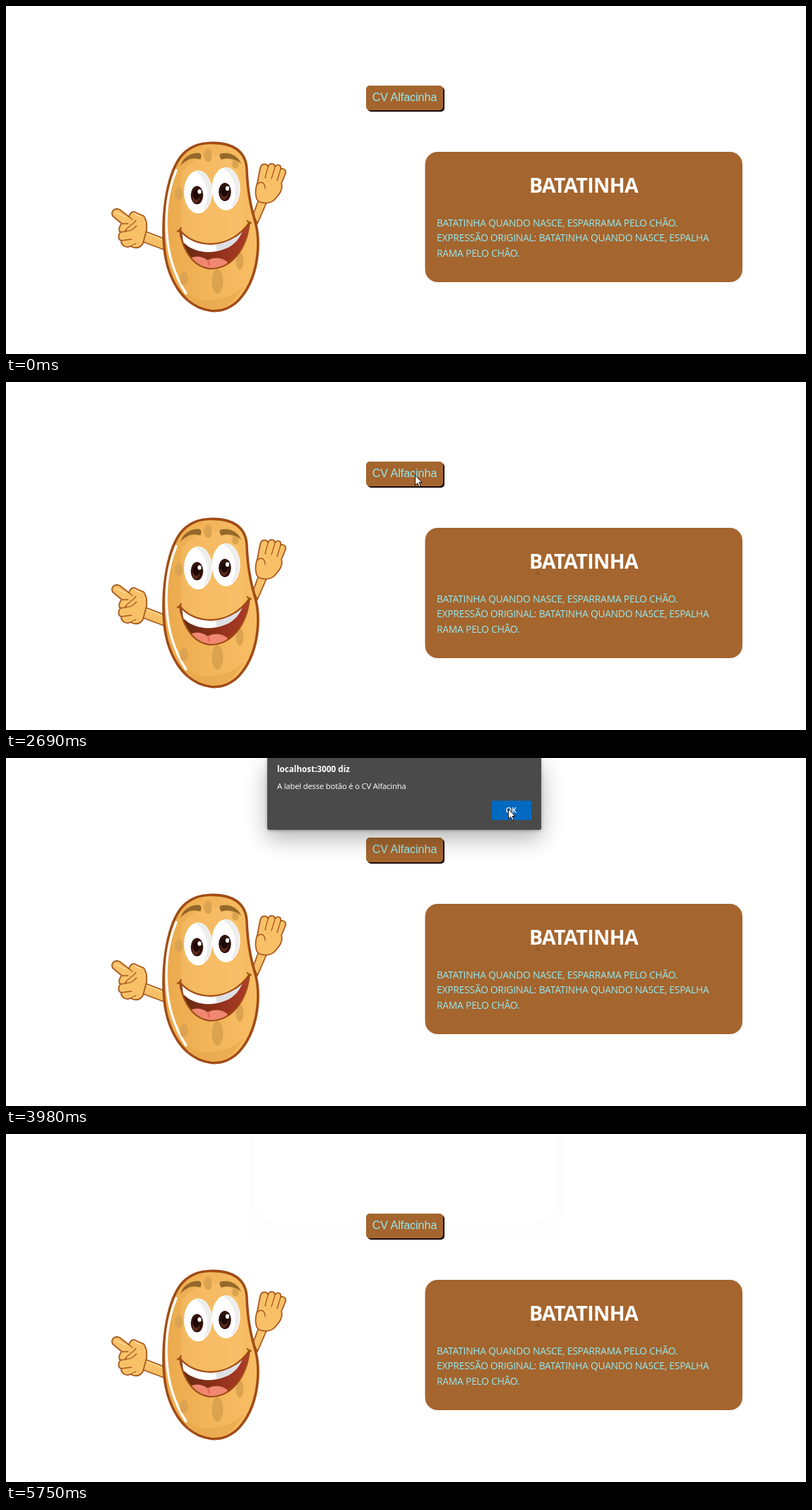
Write an HTML page that moves like this. It is 1133x494 px and loops after 6.35 s.

```html
<!DOCTYPE html>
<html lang="pt-BR">
<head>
<meta charset="utf-8">
<title>Batatinha</title>
<style>
html, body { margin: 0; width: 100%; height: 100%; overflow: hidden; background: #fff; }
svg { position: absolute; display: block; }
.full { left: 0; top: 0; }
text { font-family: "Open Sans", "Noto Sans", sans-serif; }
.button text { font: 16px "Liberation Sans", Arial, sans-serif; fill: #95eaf0; }
.card text { font-size: 13.8px; letter-spacing: -.2px; fill: #95eaf0; }
.card .title { font-size: 28.6px; letter-spacing: -.6px; font-weight: 700; fill: #fff; }
#dialog {
  left: 370px; top: 0; border-radius: 0 0 3px 3px; background: #4a4a4a;
  box-shadow: 0 12px 32px rgba(0, 0, 0, .3), 0 1px 4px rgba(0, 0, 0, .3);
  transform-origin: 50% 0;
}
#dialog text { fill: #fff; font-size: 11.3px; letter-spacing: -.2px; }
#dialog .host { font-size: 11.7px; font-weight: 700; letter-spacing: 0; }
#dialog .ok { font-size: 10.8px; font-weight: 600; letter-spacing: 0; }
</style>
</head>
<body>
<svg class="full" width="1133" height="494" viewBox="0 0 1133 494">
  <defs>
    <linearGradient id="skin">
      <stop offset="0" stop-color="#eaa94c"/>
      <stop offset=".45" stop-color="#f2b458"/>
      <stop offset="1" stop-color="#f8bd64"/>
    </linearGradient>
    <linearGradient id="throat">
      <stop offset="0" stop-color="#5f2912"/>
      <stop offset=".5" stop-color="#8a3019"/>
      <stop offset="1" stop-color="#b53d29"/>
    </linearGradient>
    <clipPath id="mouth">
      <path d="M246 318C268 346 318 346 345 307C341 345 320 372 291 373C265 372 250 346 246 318Z"/>
    </clipPath>
    <filter id="soft" x="-10%" y="-20%" width="120%" height="150%"><feGaussianBlur stdDeviation=".7"/></filter>
  </defs>

  <g id="halo">
    <rect x="340" y="-40" width="448" height="191" rx="30" fill="#fdfdfd"/>
    <rect x="352" y="-40" width="427" height="165" rx="30" fill="#fff"/>
  </g>

  <g class="button">
    <rect x="512" y="115" width="109" height="35" rx="5" fill="#1c0e06" filter="url(#soft)"/>
    <rect x="510" y="113" width="109" height="35" rx="5" fill="#a4652e"/>
    <text x="564.5" y="135.3" text-anchor="middle">CV Alfacinha</text>
  </g>

  <g class="potato" stroke-linejoin="round" stroke-linecap="round">
    <g fill="#f8c168" stroke="#a9581c" stroke-width="1.8">
      <path d="M195 319L226 331L224 346L192 334Z"/>
      <path d="M350 296L359 272L369 279L356 309Z"/>
      <path d="M199 318C200 310 198 302 195 298L181 292C177 292 175 296 174 299L161 289C154 286 148 291 151 298L164 309C160 312 159 319 162 321C158 326 159 332 163 333C163 340 170 344 176 341C184 345 190 344 194 337Z"/>
      <path d="M357 277C352 270 353 259 356 251L360 230C362 223 369 223 371 228C373 222 380 223 381 228C385 223 390 226 389 231C395 230 398 235 395 240L390 252C393 260 388 267 381 274C375 281 364 281 357 277Z"/>
      <g fill="none" stroke-width="1.3">
        <path d="M164 309L173 309M174 299L179 303M184 304C181 310 172 313 169 319C176 321 181 316 185 312M162 321L170 320M163 333L178 331M176 341L184 337"/>
        <path d="M371 228L367 244M381 228L376 245M389 231L384 248M356 253C362 247 367 252 367 259"/>
      </g>
      <path fill="none" stroke="#fde3b0" stroke-width="1.2" d="M154 292L169 300M182 295L190 299M200 323L221 332"/>
    </g>

    <path fill="url(#skin)" stroke="#a04c17" stroke-width="3.6" d="M288 194.500C322 193 340 207 341 232C342 262 346 283 352 303C362 335 357 382 335 411C322 429 304 434 290 432.500C250 427 226 385 223.500 335C221 290 229 248 240 226C250 206 266 195 288 194.500Z"/>
    <path fill="none" stroke="#fff" stroke-width="3.400" d="M241 233C222 280 219 352 255 408"/>
    <path fill="#e6a648" opacity=".55" d="M255 407C275 425 315 420 337 397C322 426 305 431 289 430C273 428 263 420 255 407Z"/>
    <path fill="#fac574" opacity=".4" d="M248 240C268 204 315 200 330 235C338 268 338 310 333 320C300 345 262 338 248 315Z"/>

    <g fill="#dba350">
      <ellipse cx="286" cy="212" rx="5.500" ry="9.500"/>
      <ellipse cx="245" cy="266" rx="5.500" ry="9.500"/>
      <ellipse cx="325" cy="224" rx="5" ry="6.500"/>
      <ellipse cx="252" cy="387" rx="5.800" ry="9.500"/>
      <ellipse cx="299.500" cy="391" rx="8" ry="17.500"/>
      <ellipse cx="331" cy="362" rx="5.500" ry="12"/>
    </g>

    <g fill="#94692b">
      <path d="M247 227C251 214 263 207 275 209C277 212 277 215 275 218C264 214 255 218 247 227Z"/>
      <path d="M303 210C315 206 328 212 333 223C324 217 314 215 305 218C303 215 302 212 303 210Z"/>
    </g>

    <g id="eye">
      <ellipse cx="272" cy="264" rx="20" ry="30.500" fill="#fff"/>
      <path fill="#ededee" d="M268 235C283 230 292 248 291 266C290 280 285 288 279 291C288 276 289 247 268 235Z"/>
      <ellipse cx="270.500" cy="268.500" rx="8.800" ry="13" fill="#32120d"/>
      <ellipse cx="269" cy="273" rx="5" ry="6.500" fill="#5d2a1c"/>
      <ellipse cx="269.500" cy="268" rx="4.500" ry="7" fill="#1c0806"/>
      <ellipse cx="274" cy="263.500" rx="2.600" ry="3.200" fill="#fff"/>
    </g>
    <use href="#eye" x="39.500" y="-4.500"/>

    <g clip-path="url(#mouth)">
      <rect x="240" y="300" width="110" height="80" fill="url(#throat)"/>
      <path fill="#fff" d="M248 314C268 346 318 346 340 308L336 317C322 354 272 358 251 335Z"/>
      <path fill="#dedfe3" d="M298 337C318 335 332 322 340 308L336 317C328 338 315 345 298 348Z"/>
      <path fill="#f08770" d="M256 361C266 353 278 355 286 361C296 355 309 358 314 364L305 378H266Z"/>
      <path fill="none" stroke="#d9634f" stroke-width="1.500" d="M286 361L288 368"/>
    </g>
    <path fill="none" stroke="#a04c17" stroke-width="2.200" d="M246 318C268 346 318 346 345 307C341 345 320 372 291 373C265 372 250 346 246 318Z"/>
    <path fill="none" stroke="#a04c17" stroke-width="2.200" d="M243 320Q246 319 248 315M342 305Q344 308 347 308"/>
  </g>

  <g class="card">
    <rect x="593.500" y="207" width="449.500" height="185" rx="18" fill="#a4652e"/>
    <text class="title" x="818" y="265.300" text-anchor="middle">BATATINHA</text>
    <text x="610" y="312.500">BATATINHA QUANDO NASCE, ESPARRAMA PELO CHÃO.</text>
    <text x="610" y="334.200">EXPRESSÃO ORIGINAL: BATATINHA QUANDO NASCE, ESPALHA</text>
    <text x="610" y="355.900">RAMA PELO CHÃO.</text>
    <path id="trace" d="M750 272H756M753 264V272" fill="none" stroke="#6f4a2b" opacity=".7"/>
  </g>
</svg>

<svg id="dialog" width="388" height="102">
  <text class="host" x="14" y="20">localhost:3000 diz</text>
  <text x="14" y="44.300">A label desse botão é o CV Alfacinha</text>
  <rect x="318" y="60.500" width="56" height="27.500" fill="#0069c0"/>
  <text class="ok" x="345.500" y="78.200" text-anchor="middle">OK</text>
</svg>

<svg class="full" width="1133" height="494" viewBox="0 0 1133 494">
  <g id="pointer">
    <path id="arrow" d="M.5 .5V14.500L3.800 11.500L6 16.500L8.200 15.500L6 10.600H10.200Z" fill="#fff" stroke="#111" stroke-width="1"/>
    <path id="beam" d="M-3 -7.500H3M0 -7.500V7.500M-3 7.500H3" fill="none" stroke="#111"/>
  </g>
</svg>

<script>
const LOOP = 6350;
const el = id => document.getElementById(id);
const show = (id, on) => { el(id).style.display = on ? "" : "none"; };

const swing = f => (1 - Math.cos(Math.PI * f)) / 2;
const out = p => f => 1 - (1 - f) ** p;

// Pointer strokes: start, end, steps, from, to, easing for x and y
const moves = [
  [1180, 1800, 9, [1096, 486], [657, 197], swing, swing],
  [1800, 2360, 8, [657, 197], [579, 132], out(1.6), out(1.6)],
  [3090, 3710, 9, [579, 132], [711, 72], out(2), out(3.6)],
  [4840, 5540, 10, [711, 72], [1104, 479], out(1.13), out(1.49)],
  [5540, 5750, 3, [1104, 479], [1106, 494], out(1), out(1)]
];

// Dialog states: time, opacity, lift
const states = [
  [0, 0, 0],
  [2760, .35, 1], [2830, .8, .3], [2900, 1, 0],
  [4110, .9, .4], [4180, .65, 1], [4260, .25, 1.6], [4320, 0, 0]
];

const latest = (list, t) => list.filter(item => item[0] <= t).pop();

function pointerAt(t) {
  const [start, end, steps, from, to, easeX, easeY] = latest(moves, t) || moves[0];
  const step = Math.floor((t - start) * steps / (end - start) + .04);
  const f = Math.min(1, Math.max(0, step / steps));
  return [
    Math.round(from[0] + (to[0] - from[0]) * easeX(f)),
    Math.round(from[1] + (to[1] - from[1]) * easeY(f))
  ];
}

function overText(x, y) {
  const title = x > 741 && x < 895 && y > 236 && y < 274;
  const right = y < 319 ? 952 : y < 341 ? 995 : 728;
  return title || (x > 611 && x < right && y > 297 && y < 362);
}

function draw(t) {
  const [x, y] = pointerAt(t);
  const typing = overText(x, y);
  show("pointer", t >= 1180 && t < 5750);
  show("arrow", !typing);
  show("beam", typing);
  el("pointer").setAttribute("transform", `translate(${x} ${y})`);

  const [, opacity, lift] = latest(states, t);
  const dialog = el("dialog");
  show("dialog", opacity > 0);
  dialog.style.opacity = opacity;
  dialog.style.transform = lift
    ? `translateY(${-10 * lift}px) perspective(1000px) rotateX(${5.7 * lift}deg)`
    : "none";

  show("halo", t >= 4320);
  show("trace", t >= 1590);
}

const begin = performance.now();
function tick() {
  draw((performance.now() - begin) % LOOP);
  requestAnimationFrame(tick);
}
draw(0);
requestAnimationFrame(tick);
</script>
</body>
</html>
```
